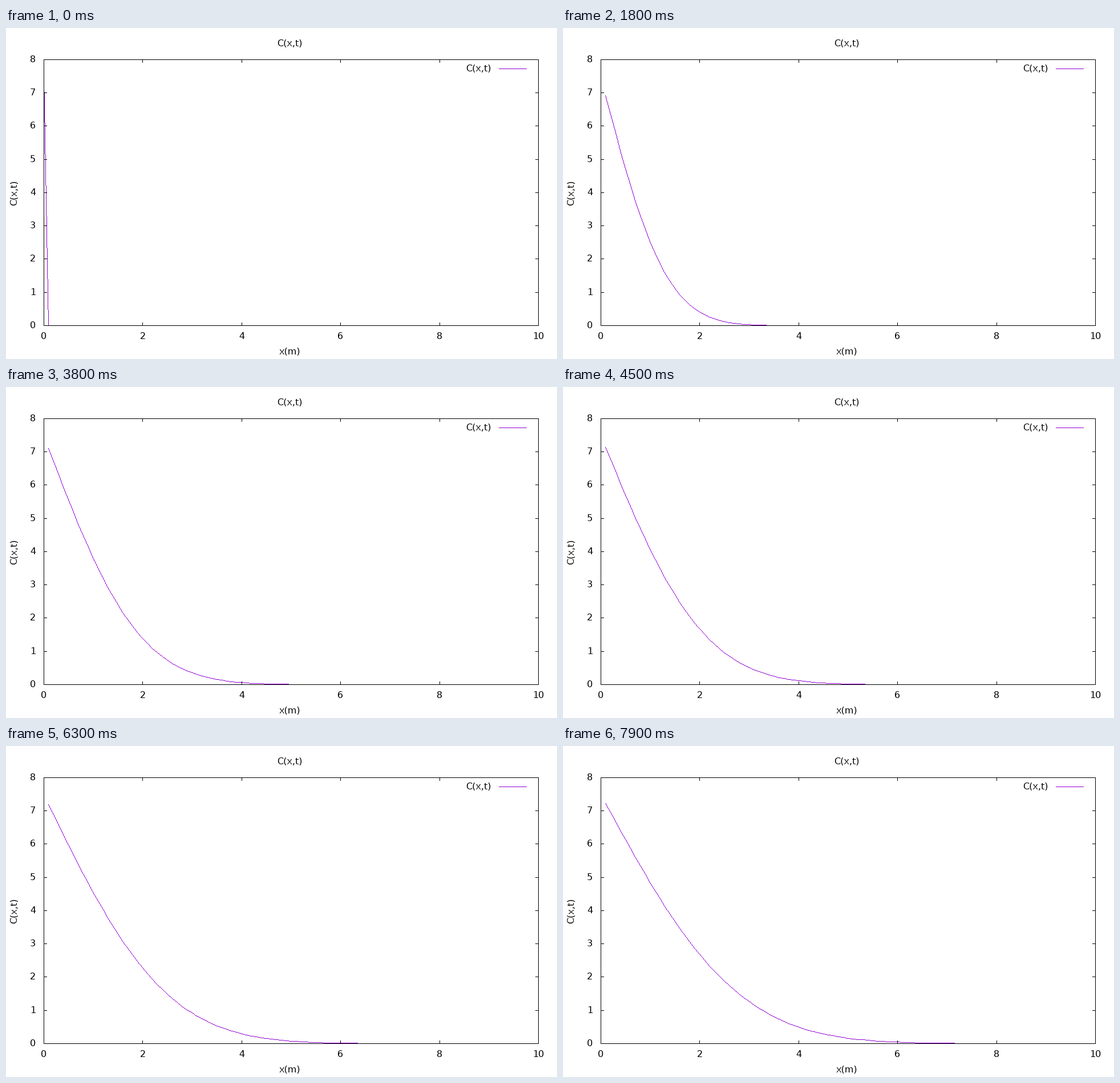
A matplotlib script that plays this animation: 966 by 580 pixels, repeating every 8000 ms.

```python
import math

import matplotlib.pyplot as plt
import numpy as np
from matplotlib.animation import FuncAnimation
from matplotlib.colors import to_rgba

W, H, DPI = 966, 580, 100
PX = 72 / DPI                      # one pixel in points
LEFT, RIGHT, TOP, BOTTOM = 66, 933, 55, 521
X_MAX, Y_MAX = 10, 8
X_SCALE = 86.762                   # pixels per metre
FRAMES, STEP_MS = 80, 100

C0 = 7.5                           # concentration at the inlet
SPREAD = 0.12                      # 4 * D * dt
PURPLE = "#9400d3"

plt.rcParams["font.family"] = "DejaVu Sans"
plt.rcParams["font.size"] = 16 * PX
plt.rcParams["text.hinting"] = "native"

fig = plt.figure(figsize=(W / DPI, H / DPI), dpi=DPI, facecolor="white")
ax = fig.add_axes([0, 0, 1, 1])
ax.axis("off")


def col(x):
    return np.floor(LEFT + np.asarray(x) * X_SCALE).astype(int)


def row(y, lift=0.0):
    up = np.asarray(y) * (BOTTOM - TOP) / Y_MAX
    return BOTTOM - np.floor(up + 0.5 + lift).astype(int)


def stroke(x0, y0, x1, y1, color="black"):
    """Line one pixel wide, from pixel to pixel inclusive."""
    ax.plot([x0 + 0.5, x1 + 0.5], [y0 + 0.5, y1 + 0.5], color=color, lw=PX,
            solid_capstyle="projecting", snap=False, zorder=3)


def label(x, y, s, ha="center"):
    ax.text(x, y, s, ha=ha, va="baseline", color="black")


def draw_frame_and_labels():
    for y in (TOP, BOTTOM):
        stroke(LEFT, y, RIGHT, y)
    for x in (LEFT, RIGHT):
        stroke(x, TOP, x, BOTTOM)

    for v in range(0, X_MAX + 1, 2):
        c = int(col(v))
        stroke(c, BOTTOM, c, BOTTOM - 5)
        stroke(c, TOP, c, TOP + 5)
        label(c + 0.5, 545, str(v))
    for v in range(Y_MAX + 1):
        r = int(row(v))
        stroke(LEFT, r, LEFT + 5, r)
        stroke(RIGHT, r, RIGHT - 5, r)
        label(52, r + 5, str(v), ha="right")

    label(497.5, 32, "C(x,t)")
    label(497, 572, "x(m)")
    label(851, 76, "C(x,t)", ha="right")
    stroke(864, 71, 912, 71, PURPLE)
    ax.text(22, 289, "C(x,t)", rotation=90, ha="right", va="center")


def profile(n):
    """Pixel vertices of the concentration curve after n time steps."""
    if n == 0:
        return col([0, 0.1]), row([C0, 0])
    x = np.arange(1, 101) / 10
    c = [C0 * math.erfc(v / math.sqrt(SPREAD * n)) for v in x]
    return col(x), row(c, lift=0.02 + 0.2 / n)


def raster(cols, rows):
    """Paint the polyline without smoothing."""
    img = np.zeros((H, W, 4))
    for x0, y0, x1, y1 in zip(cols, rows, cols[1:], rows[1:]):
        k = max(abs(x1 - x0), abs(y1 - y0)) + 1
        xs = np.rint(np.linspace(x0, x1, k)).astype(int)
        ys = np.rint(np.linspace(y0, y1, k)).astype(int)
        img[ys, xs] = to_rgba(PURPLE)
    return img


curve = ax.imshow(raster(*profile(0)), extent=(0, W, H, 0), aspect="auto",
                  interpolation="nearest", zorder=1)
draw_frame_and_labels()
ax.set_xlim(0, W)
ax.set_ylim(H, 0)


def update(n):
    curve.set_data(raster(*profile(n)))
    return (curve,)


anim = FuncAnimation(fig, update, frames=FRAMES, interval=STEP_MS, repeat=True,
                     repeat_delay=0, blit=False)
plt.show()
```
